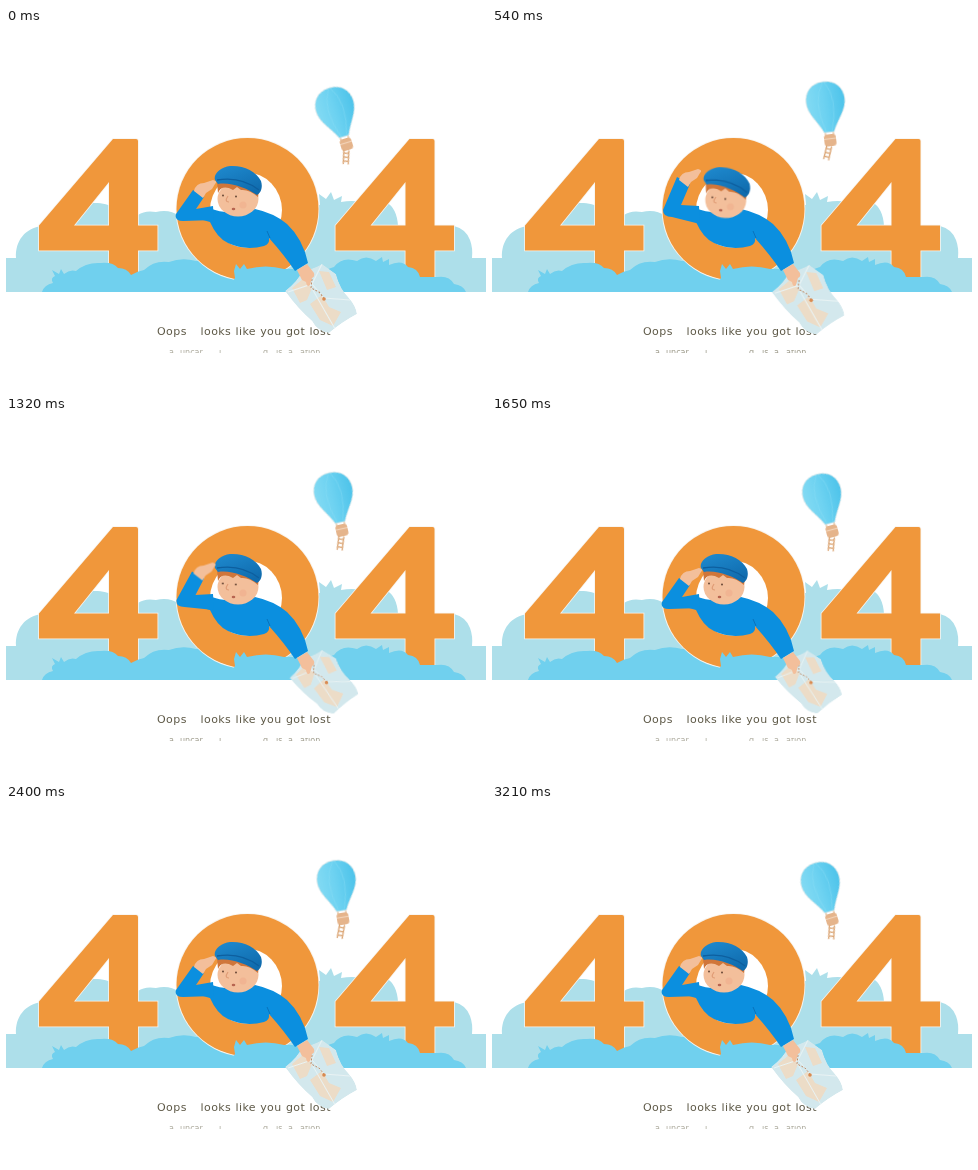
An HTML page that plays this animation: 480x360 px, repeating every 3.24 s.

```html
<!DOCTYPE html>
<html lang="en">
<head>
<meta charset="utf-8">
<title>404</title>
<style>
html, body { margin: 0; width: 100%; height: 100%; overflow: hidden; background: #fff; }
svg { display: block; width: 480px; height: 360px; }
text { font: 11px "DejaVu Sans", sans-serif; letter-spacing: .42px; word-spacing: .3px; fill: #5d5846; }
.small { font-size: 8px; letter-spacing: 0; fill: #8d8a78; }
.digits { fill: #f0973b; stroke: #f8f4ee; stroke-width: 1.6; paint-order: stroke; }

#float, #tilt, #upper, #hand, #head, #map, #eyes, #words { animation: 3240ms ease-in-out infinite; }
#float { animation-name: float; }
#tilt { animation-name: tilt; }
#upper { animation-name: lift; }
#hand { animation-name: wave; }
#head { animation-name: nod; transform-origin: 232px 185px; }
#eyes { animation-name: look; }
#map { animation-name: swing; transform-origin: 300px 240px; }
#words { animation-name: fade; }

@keyframes float {
  0%, 100% { transform: translate(329px, 79px); }
  16.67% { transform: translate(333.5px, 73.5px); }
  30.56% { transform: translate(328px, 74px); }
  37% { transform: translate(327px, 76px); }
  50.93% { transform: translate(330px, 77.5px); }
  63.89% { transform: translate(334px, 75px); }
  84.26% { transform: translate(327px, 77.5px); }
  99.07% { transform: translate(328.5px, 78px); }
}
@keyframes tilt {
  0%, 99.07%, 100% { transform: rotate(-17deg); }
  16.67% { transform: rotate(-7deg); }
  30.56% { transform: rotate(-10deg); }
  50.93% { transform: rotate(-15deg); }
  63.89% { transform: rotate(-8deg); }
  84.26% { transform: rotate(-11deg); }
}
@keyframes lift {
  0%, 50.93%, 100% { d: path("M207 178 L190 181 L198 169 L187 162 L170 186 Q168 193 177 193 L208 192 Z"); }
  16.67%, 30.56% { d: path("M207 178 L189 177 L198 156 L185 149 L171 182 Q171 189 180 189 L208 196 Z"); }
}
@keyframes wave {
  0%, 50.93%, 100% { transform: none; }
  16.67%, 30.56% { transform: translate(-1px, -11px); }
}
@keyframes nod {
  0%, 30.56%, 100% { transform: none; }
  16.67% { transform: translate(1px, 1.5px) rotate(3deg); }
}
@keyframes look {
  0%, 50%, 100% { transform: none; }
  16.67% { transform: translate(1.5px, 1px); }
  30.56% { transform: translate(-.5px, 0); }
}
@keyframes swing {
  0%, 63.89%, 100% { transform: none; }
  16.67% { transform: translate(1px, 1px) scale(1.01); }
  30.56% { transform: translate(2px, -1px) rotate(-6deg) scale(.95); }
  50.93% { transform: translate(1px, -1px) rotate(-3deg) scale(.92); }
}
@keyframes fade {
  0%, 50%, 100% { opacity: .75; }
  30.56% { opacity: 1; }
}
</style>
</head>
<body>
<svg viewBox="0 0 480 360">
  <defs>
    <linearGradient id="air">
      <stop offset="0" stop-color="#82daf3"/>
      <stop offset=".45" stop-color="#6dd2f1"/>
      <stop offset="1" stop-color="#4dc3ea"/>
    </linearGradient>
    <linearGradient id="cap" x2=".6" y2="1">
      <stop offset="0" stop-color="#1f8bd0"/>
      <stop offset="1" stop-color="#106cae"/>
    </linearGradient>
    <clipPath id="line1"><path d="M140 299.2H340V309H140Z"/></clipPath>
    <clipPath id="line2"><path d="M140 322H340V325H140Z"/></clipPath>
    <clipPath id="sheet"><path id="paper" d="M316 236 L330 246 Q334 261 343 270 Q350 278 351 286 Q336 294 323 305 Q311 303 306 293 Q292 281 279 263 Q292 253 296 243 Q308 241 316 236Z"/></clipPath>
    <path id="four" d="M107 111H130Q132 111 132 113V197.5H151.5V222.5H132V249H103V222.5H33V197.5ZM103 154L68 197.5H103Z" fill-rule="evenodd"/>
  </defs>

  <!-- Distant shrubs -->
  <g fill="#addfea">
    <path d="M0 230H10C9 213 19 200 36 198C42 184 58 182 65 182C76 173 99 173 108 180Q123 180 132 187Q139 182 150 184Q164 181 173 188H240V240H0Z"/>
    <path d="M260 240V182Q309 176 314 177L313 166L320 171L325 164L328 172L336 168L335 174Q350 171 361 176Q371 170 380 174Q391 180 392 198H448Q460 201 464 212Q467 220 466 230H480V264H260Z"/>
    <path d="M0 230H480V264H0Z"/>
  </g>

  <!-- Digits among the near shrubs -->
  <g class="digits">
    <use href="#four"/>
    <use href="#four" x="296.5"/>
  </g>
  <path fill="#70d0ee" d="M36 264Q38 257 47 255Q44 250 49 248L46 242L53 246L55 241L58 246Q64 241 70 243Q80 234 95 235Q107 234 112 240Q121 240 125 247Q132 243 138 242Q148 232 163 234Q176 229 190 233Q206 230 215 238L240 251V264Z"/>
  <circle class="digits" cx="241.5" cy="181" r="71"/>
  <ellipse cx="240" cy="182" rx="36" ry="37.5" fill="#fff"/>
  <path fill="#70d0ee" d="M220 264L229 250L228 243L230 236L234 241L238 236L241 241Q260 236 278 241Q294 239 302 250H315Q318 241 328 239Q336 228 351 233Q360 226 370 233L376 229L377 234L383 231L383 237Q396 231 402 239Q412 240 414 249H431Q443 247 448 256Q457 257 460 264Z"/>

  <!-- Captions -->
  <g clip-path="url(#line1)">
    <text x="151" y="307">Oops</text>
    <text x="194.5" y="307">looks like you got lost</text>
  </g>
  <g id="words" clip-path="url(#line2)">
    <text class="small" x="163" y="327">a</text>
    <text class="small" x="174" y="327">uncar</text>
    <text class="small" x="213" y="327">i</text>
    <text class="small" x="257" y="327">g</text>
    <text class="small" x="270" y="327">is</text>
    <text class="small" x="282" y="327">a</text>
    <text class="small" x="294" y="327">ation</text>
  </g>

  <!-- Balloon -->
  <g id="float">
    <g id="tilt">
      <path d="M-4 29L-4 36M4 29L4 36" stroke="#d9a878"/>
      <path fill="url(#air)" stroke="#dfe9ea" stroke-width=".8" d="M0 -20C12 -20 19.5 -12 19.5 -1C19.5 11 10 19 5 31H-5C-10 19 -19.5 11 -19.5 -1C-19.5 -12 -12 -20 0 -20Z"/>
      <path fill="none" stroke="#8fdef5" stroke-width=".8" opacity=".5" d="M-1 -19Q-13 -2 -3 30M1 -19Q13 -2 3 30"/>
      <rect x="-6" y="33" width="12" height="12" rx="3.5" fill="#e5b48b"/>
      <path d="M-6 37.5H6" stroke="#f2d3b8" stroke-width="1.2"/>
      <g transform="rotate(20 0 40)" fill="none" stroke="#dba574" stroke-width="1.3">
        <path d="M-2.5 45V59M2.5 45V59M-2.5 48H2.5M-2.5 52H2.5M-2.5 56H2.5"/>
      </g>
    </g>
  </g>

  <!-- Boy -->
  <g fill="#0b8fdf">
    <path d="M203 180Q222 188 249 181Q268 185 281 196Q297 211 302 235L289 243Q279 228 263 210Q264 216 258 218Q239 223 222 215Q211 210 204 194L190 190Z"/>
    <path id="upper" d="M207 178 L190 181 L198 169 L187 162 L170 186 Q168 193 177 193 L208 192 Z"/>
  </g>
  <path d="M264 210L261 203" stroke="#0873bd" fill="none"/>
  <g id="head">
    <ellipse cx="232" cy="171" rx="20.5" ry="17.5" fill="#f3bf9b"/>
    <path fill="#d0763a" d="M211 154Q226 150 253 163L252 169Q243 161 235 162L231 159L227 162Q216 156 212 165Z"/>
    <path fill="url(#cap)" d="M209 152C207 146 215 139 224 138C237 137 250 143 255 153C257 159 255 165 251 167C240 160 225 154 212 156Z"/>
    <path fill="none" stroke="#0d5f9f" stroke-width="1.4" d="M211 152Q235 148 253 162"/>
    <g id="eyes" fill="#6b4a37">
      <circle cx="217" cy="167.5" r="1"/>
      <circle cx="230" cy="168.5" r="1"/>
    </g>
    <path d="M222 168Q218 174 223 174" fill="none" stroke="#df9b75" stroke-width="1.2"/>
    <ellipse cx="227.5" cy="181" rx="1.8" ry="1.3" fill="#b76550"/>
    <circle cx="237" cy="177" r="3.5" fill="#eda485" opacity=".4"/>
  </g>
  <path id="hand" fill="#f3bf9b" d="M188 163Q190 155 198 155L207 152Q212 153 209 156L206 161L200 165L197 170Z"/>

  <!-- Map -->
  <g id="map">
    <g clip-path="url(#sheet)">
      <use href="#paper" fill="#d3e8ed"/>
      <path fill="#ecdcc7" d="M286 260L298 250L306 260L301 272L294 275ZM304 276L316 267L323 279L335 284L327 298L314 292ZM313 243L323 244L330 259L321 262Z"/>
      <path fill="none" stroke="#e9f3f4" stroke-width="1" d="M296 243L332 306M316 236L306 256L318 270L344 272M282 264L306 256"/>
    </g>
    <path fill="none" stroke="#bd8b67" stroke-width="1" stroke-dasharray="2 1.5" d="M306 251L305 260L313 264L318 270"/>
    <circle cx="318" cy="271" r="1.8" fill="#d98a50"/>
  </g>
  <path fill="#f3bf9b" d="M291 242L301 236L308 245Q309 249 306 250L304 257Q301 260 300 254L296 252Z"/>
</svg>
</body>
</html>
```
